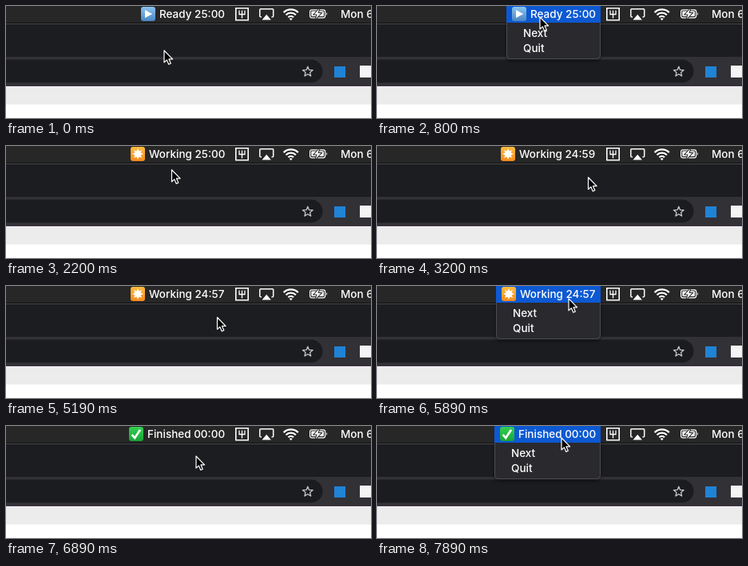
An HTML page for the animation above (8 s loop, 457x141 px).

```html
<!DOCTYPE html>
<html lang="en">
<head>
<meta charset="utf-8">
<title>Menu bar timer</title>
<style>
  html, body { margin: 0; width: 100%; height: 100%; overflow: hidden; background: #fff; }
  svg { display: block; width: 457px; height: 141px; }
  text { font: 550 13.5px Inter, "Open Sans", sans-serif; letter-spacing: 0; fill: #fff; }
</style>
</head>
<body>
<svg viewBox="0 0 457 141">
  <defs>
    <linearGradient id="blue" x2="0" y2="1"><stop stop-color="#8cc4ee"/><stop offset="1" stop-color="#4a87c4"/></linearGradient>
    <linearGradient id="orange" x2="0" y2="1"><stop stop-color="#ffbd3e"/><stop offset="1" stop-color="#f58a1c"/></linearGradient>
    <linearGradient id="green" x2="0" y2="1"><stop stop-color="#35d052"/><stop offset="1" stop-color="#18a537"/></linearGradient>
    <filter id="shade" x="-10%" y="-20%" width="120%" height="150%"><feDropShadow dx="0" dy="2" stdDeviation="2.5" flood-opacity=".5"/></filter>
  </defs>

  <!-- browser window -->
  <path fill="#1c1d21" d="M0 22H457V65H0z"/>
  <path fill="#323136" d="M0 64H457V101H0z"/>
  <path fill="#1b1c20" d="M0 67.5H382a14.5 14.5 0 0 1 0 29H0z"/>
  <path fill="#3b2b40" d="M0 100H457V101H0z"/>
  <path fill="#ececec" d="M0 101H457V124H0z"/>
  <path id="star" fill="none" stroke="#c4c5c8" stroke-width="1.3" stroke-linejoin="round"/>
  <path fill="#1f83d6" d="M411 76h14v14h-14z"/>
  <path fill="#f4f4f4" d="M443 75h15v15h-15z"/>

  <!-- menu bar -->
  <path fill="#272728" d="M0 0H457V21H0z"/>
  <path fill="#0e0e10" d="M0 21H457V22H0z"/>
  <path fill="#4a4a4d" d="M0 22H457V23H0z"/>
  <g fill="none" stroke="#fff">
    <path stroke-width="1.6" d="M287.8 2.8h15.4v15h-15.4z"/>
    <path stroke-width="1.3" d="M292 5.5v5M295.5 5.5v10M299 5.5v5M291.4 10.5h8.2"/>
    <path stroke-width="1.5" d="M320 13.7h-1.2q-1 0-1-1V4.8q0-1 1-1h14.9q1 0 1 1v7.9q0 1-1 1H332.5"/>
    <path stroke-width="2.2" d="M347.6 8.1a13 13 0 0 1 18.2 0M350.5 11.2a8.8 8.8 0 0 1 12.4 0M353.4 14.2a4.7 4.7 0 0 1 6.6 0"/>
    <rect x="380.6" y="4.8" width="19" height="10" rx="2.2" stroke-width="1.2"/>
  </g>
  <g fill="#fff">
    <path d="M326.2 10.8l5.7 6.8h-11.4zM356.7 18.2l-2-2.2q2-1.6 4 0zM401 8q2 1.9 0 3.8z"/>
    <rect x="382.3" y="6.5" width="15.6" height="6.6" rx="1"/>
    <path stroke="#272728" stroke-width="2" paint-order="stroke" d="M392.2 3.6l-6.4 7h3.8l-1.8 5.6 6.6-7.2h-3.9z"/>
  </g>
  <text x="419" y="15">Mon 6</text>

  <!-- dropdown -->
  <g id="menu">
    <path id="panel" fill="#2b2b2d" stroke="#4e4e51" filter="url(#shade)"/>
    <rect id="pick" y="25" height="19" fill="#0d59d2"/>
    <text id="next" y="39">Next</text>
    <text id="quit" y="58">Quit</text>
  </g>
  <rect id="lit" height="21" fill="#0d59d2"/>
  <text id="title" y="15"></text>
  <g id="icons">
    <g id="ready"><rect width="18" height="18" rx="3" fill="url(#blue)"/><path fill="#fff" d="M5 4l9.2 5L5 14z"/></g>
    <g id="working"><rect width="18" height="18" rx="3" fill="url(#orange)"/><path id="burst" fill="#fff"/></g>
    <g id="finished"><rect width="18" height="18" rx="3" fill="url(#green)"/><path fill="none" stroke="#fff" stroke-width="2.6" d="M3.6 9.8l3.6 4.2L14 3.8"/></g>
  </g>
  <path id="cursor" fill="#000" stroke="#fff" stroke-width="1.2" stroke-linejoin="round" d="M0 0V15L3.4 11.9 5.8 17.4 8.3 16.3 6 10.9H10.6z"/>
</svg>
<script>
const LOOP = 8000, RIGHT = 280;
const $ = id => document.getElementById(id);
const set = (id, attrs) => { for (const k in attrs) $(id).setAttribute(k, attrs[k]); };

// start, label, left edge of the label
const titles = [
  [0, 'Ready 25:00', 192], [2200, 'Working 25:00', 179], [3200, 'Working 24:59', 178],
  [4200, 'Working 24:58', 178], [5190, 'Working 24:57', 179], [6190, 'Working 24:56', 178],
  [6890, 'Finished 00:00', 177]
];
// time, x, y
const path = [
  [0, 198, 56], [500, 204, 14], [800, 204, 14], [1300, 207.5, 30], [2200, 207.5, 30],
  [2700, 264.5, 39.5], [5390, 264.5, 39.5], [5990, 238, 14], [6090, 238, 14], [6390, 238, 26],
  [6590, 238, 26], [6890, 238, 38], [7390, 238, 38], [7590, 231, 15], [LOOP, 231, 15]
];
// opened, item clicked
const menus = [[800, 1800], [5890, 6590], [7890, Infinity]];

function spikes(cx, cy, n, outer, inner) {
  const pts = [];
  for (let i = 0; i < 2 * n; i++) {
    const a = i * Math.PI / n - Math.PI / 2, r = i % 2 ? inner : outer;
    pts.push((cx + r * Math.cos(a)).toFixed(2) + ' ' + (cy + r * Math.sin(a)).toFixed(2));
  }
  return 'M' + pts.join('L') + 'z';
}

function pointer(t) {
  const i = Math.max(1, path.findIndex(p => p[0] >= t));
  const [t0, x0, y0] = path[i - 1], [t1, x1, y1] = path[i];
  const u = (t - t0) / (t1 - t0), e = u * u * (3 - 2 * u);
  return [x0 + (x1 - x0) * e, y0 + (y1 - y0) * e];
}

// the screen refreshes ten times a second
function tick(t) {
  const from = t < 5190 ? 0 : 5190;
  return from + Math.floor((t - from) / 100) * 100;
}

function draw(now) {
  const t = tick(now % LOOP);
  const [, label, x] = titles.filter(s => s[0] <= t).pop();
  const [cx, cy] = pointer(t);
  const [, clicked] = menus.filter(m => m[0] <= t).pop() || [0, -LOOP];
  const since = t - clicked;
  const blink = since >= 0 && since < 100;
  const alpha = since < 200 ? 1 : since < 300 ? .6 : since < 400 && label[0] === 'R' ? .25 : 0;
  const left = x - 30, width = RIGHT - left;

  $('title').textContent = label;
  set('title', { x });
  set('icons', { transform: `translate(${x - 23} 1)` });
  for (const id of ['ready', 'working', 'finished'])
    $(id).style.display = label.toLowerCase().startsWith(id) ? '' : 'none';

  set('menu', { opacity: alpha });
  set('panel', { d: `M${left + .5} 20.5H${RIGHT - .5}V61.5q0 5-5 5H${left + 5.5}q-5 0-5-5z` });
  set('pick', { x: left + .5, width: width - 1, opacity: cy >= 25 && !blink ? 1 : 0 });
  set('next', { x: left + 21 });
  set('quit', { x: left + 21 });
  set('lit', { x: left, width, opacity: alpha === 1 ? 1 : 0 });
  set('cursor', { transform: `translate(${cx.toFixed(1)} ${cy.toFixed(1)})` });
}

set('star', { d: spikes(377.8, 82.8, 5, 6.6, 2.9) });
set('burst', { d: spikes(9, 9, 8, 7, 3.9) });

function loop() {
  draw(performance.now());
  requestAnimationFrame(loop);
}
loop();
</script>
</body>
</html>
```
